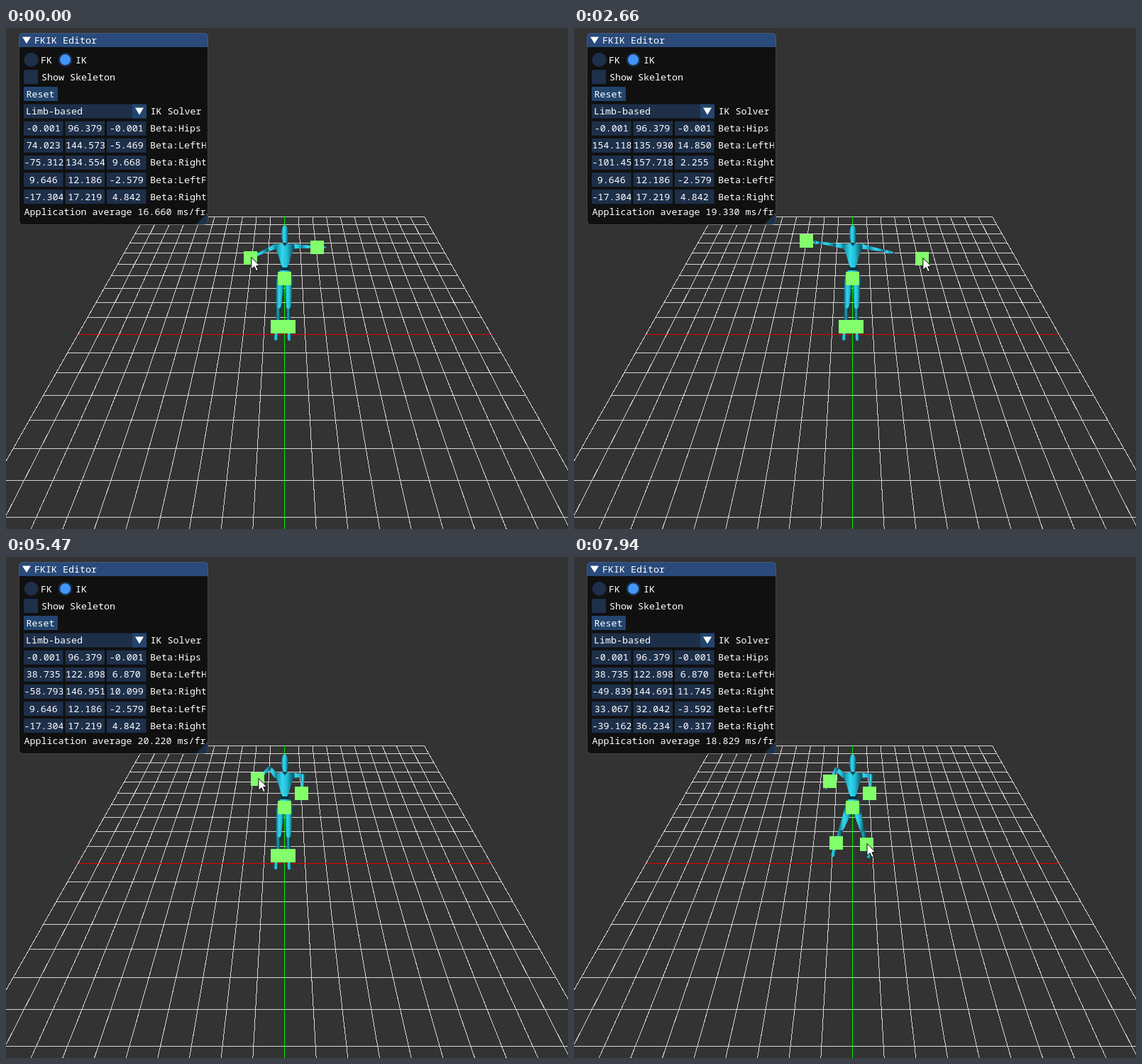
An HTML page that plays this animation: 792x707 px, repeating every 8 s.

```html
<!DOCTYPE html>
<html lang="en">
<head>
<meta charset="utf-8">
<title>FKIK Editor</title>
<style>
  html, body { margin: 0; width: 100%; height: 100%; overflow: hidden; background: #333; }
  svg { display: block; }
  text { font: 13.333px "Noto Sans Mono", "DejaVu Sans Mono", monospace; fill: #fff; white-space: pre; }
</style>
</head>
<body>
<svg id="stage" width="100%" height="100%" viewBox="0 0 792 707">
  <defs>
    <linearGradient id="skin">
      <stop offset="0" stop-color="#127f94"/>
      <stop offset=".35" stop-color="#2fd8f0"/>
      <stop offset=".6" stop-color="#25bdd6"/>
      <stop offset="1" stop-color="#0a4552"/>
    </linearGradient>
    <linearGradient id="shade">
      <stop offset="0" stop-color="#0a3f4a"/>
      <stop offset=".4" stop-color="#1fa3ba"/>
      <stop offset="1" stop-color="#05181c"/>
    </linearGradient>
  </defs>
  <rect width="792" height="707" fill="#333"/>
  <g id="grid" fill="none" shape-rendering="crispEdges"></g>
  <g id="body" fill="url(#skin)"></g>
  <g id="handles" fill="#82ff6a"></g>
  <g id="panel"></g>
  <path id="cursor" d="M0 0V17L4 13.3L6.8 19.3L9.6 18L6.9 12.2H12Z" fill="#fff" stroke="#000"/>
</svg>
<script>
const LOOP = 8000, CELL = 50, REACH = 34, UPPER_ARM = 13.5;
const $ = id => document.getElementById(id);
const clamp = (v, lo, hi) => Math.min(hi, Math.max(lo, v));
const ease = u => u * u * (3 - 2 * u);
const mix = (a, b, u) => a.map((v, i) => v + (b[i] - v) * u);

function add(parent, tag, attrs = {}, text) {
  const el = document.createElementNS('http://www.w3.org/2000/svg', tag);
  for (const k in attrs) el.setAttribute(k, attrs[k]);
  if (text !== undefined) el.textContent = text;
  return parent.appendChild(el);
}

// World units to screen pixels
function project([x, y, z]) {
  const w = 1 - 0.00054 * y - 0.0009556 * z;
  return [392.5 + 0.582 * x / w, -81.1 + (513.4 - 1.048 * y) / w];
}

const HIPS = 0, LEFT_HAND = 1, RIGHT_HAND = 2, LEFT_FOOT = 3, RIGHT_FOOT = 4;
const names = ['Hips', 'LeftHand', 'RightHand', 'LeftFoot', 'RightFoot'];
const rest = [
  [-0.001, 96.379, -0.001], [74.023, 144.573, -5.469], [-75.312, 134.554, 9.668],
  [9.646, 12.186, -2.579], [-17.304, 17.219, 4.842]
];

// Each drag eases through its stops, one per step
const drags = [
  { goal: RIGHT_HAND, start: 50, step: 655,
    stops: [[-62, 124, 12], [-111.65, 148.871, 7.479], [-101.45, 157.718, 2.255]] },
  { goal: LEFT_HAND, start: 2160, step: 500,
    stops: [[154.119, 135.93, 14.85], [58, 110, 14], [38.735, 122.898, 6.87]] },
  { goal: RIGHT_HAND, start: 4420, step: 1430, stops: [[-49.839, 144.691, 11.745]] },
  { goal: RIGHT_FOOT, start: 6480, step: 170, stops: [[-39.162, 36.234, -0.317]], grip: [-5.5, -4] },
  { goal: LEFT_FOOT, start: 7500, step: 300, stops: [[33.067, 32.042, -3.592]] }
];

function pose(t) {
  const values = [...rest];
  for (const { goal, start, step, stops } of drags) {
    const path = [values[goal], ...stops];
    const p = clamp((t - start) / step, 0, stops.length);
    const i = Math.min(Math.floor(p), stops.length - 1);
    values[goal] = mix(path[i], path[i + 1], ease(p - i));
  }
  return values;
}

// The pointer holds the dragged handle, then glides to the next one
function pointer(t, points) {
  const spot = ({ goal, grip = [1, -1] }) => points[goal].map((v, i) => v + grip[i]);
  const next = drags.findIndex(d => t < d.start - 20);
  if (next < 0) return spot(drags[drags.length - 1]);
  if (next === 0) return spot(drags[0]);
  const last = drags[next - 1], leave = last.start + last.step * last.stops.length - 90;
  const u = clamp((t - leave) / (drags[next].start - 20 - leave), 0, 1);
  return mix(spot(last), spot(drags[next]), ease(u));
}

function buildGrid() {
  const line = (a, b, stroke) =>
    add($('grid'), 'path', { d: `M${project(a)}L${project(b)}`, stroke });
  const far = 10 * CELL;
  const across = (v, color) => line([-far, 0, v], [far, 0, v], color);
  const along = (v, color) => line([v, 0, -far], [v, 0, far], color);
  for (let v = -far; v <= far; v += CELL) {
    if (!v) continue;
    along(v, '#d6d6d6');
    across(v, '#d6d6d6');
  }
  across(0, '#e00000');
  along(0, '#00f000');
}

const fields = [];
let status;

function buildPanel() {
  const p = $('panel'), frame = '#1d2f49', button = '#23456d', fieldWidth = 55.5;
  const box = (x, y, width, height, fill) => add(p, 'rect', { x, y, width, height, fill });
  const shape = (d, fill) => add(p, 'path', { d, fill });
  const label = (x, y, s) => add(p, 'text', { x, y }, s);
  const clipped = (x, y, width, s) =>
    add(add(p, 'svg', { x, y, width, height: 20 }), 'text', { y: 14.5 }, s);
  const edge = { x: 18.5, y: 7.5, width: 266, height: 270, rx: 6 };

  add(p, 'rect', { ...edge, fill: '#0f0f0f', 'fill-opacity': .97 });
  shape('M18 27V13Q18 7 24 7H279Q285 7 285 13V27Z', '#294a7a');
  shape('M285 260V271Q285 277 279 277H268Z', '#1c3149');
  add(p, 'rect', { ...edge, fill: 'none', stroke: '#6e6e80', 'stroke-opacity': .4 });
  shape('M23 12.5H35L29 22Z', '#fff');
  label(40, 21.5, 'FKIK Editor');

  for (const x of [35.5, 83.5]) add(p, 'circle', { cx: x, cy: 44.7, r: 10, fill: frame });
  add(p, 'circle', { cx: 83.5, cy: 44.7, r: 7.5, fill: '#4296fa' });
  label(49, 49.5, 'FK');
  label(98, 49.5, 'IK');
  box(25, 59, 20, 20, frame);
  label(50, 74, 'Show Skeleton');
  box(25, 83, 48, 20, button);
  label(28.5, 98, 'Reset');
  box(25, 107.5, 173, 20, frame);
  box(178, 107.5, 20, 20, button);
  shape('M182 112.5H194L188 122.5Z', '#fff');
  label(28, 122, 'Limb-based');
  label(203.5, 122, 'IK Solver');

  names.forEach((name, row) => {
    const y = 131.7 + row * 24.1;
    fields.push([0, 1, 2].map(col => {
      const x = 25 + col * 58.5;
      box(x, y, fieldWidth, 20, frame);
      return s => {
        text.textContent = s;
        text.setAttribute('x', Math.max(.5, (fieldWidth - 8 * s.length) / 2));
      };
      var text;
    }).map((_, col) => {
      const text = clipped(25 + col * 58.5, y, fieldWidth, '');
      return s => {
        text.textContent = s;
        text.setAttribute('x', Math.max(.5, (fieldWidth - 8 * s.length) / 2));
      };
    }));
    clipped(203, y, 78.5, 'Beta:' + name);
  });
  status = clipped(25.5, 249.5, 257, '');
}

// Tapered limb with round ends
function limb(a, b, ra, rb, fill = 'skin') {
  const dx = b[0] - a[0], dy = b[1] - a[1], d = Math.hypot(dx, dy) || 1;
  const at = (p, r) => `${(p[0] - dy / d * r).toFixed(2)} ${(p[1] + dx / d * r).toFixed(2)}`;
  return {
    fill: `url(#${fill})`,
    d: `M${at(a, ra)}L${at(b, rb)}A${rb} ${rb} 0 0 0 ${at(b, -rb)}`
      + `L${at(a, -ra)}A${ra} ${ra} 0 0 0 ${at(a, ra)}Z`
  };
}

function arm(side, goal) {
  const shoulder = [392.5 + 12.5 * side, 308];
  const dx = goal[0] - shoulder[0], dy = goal[1] - shoulder[1], full = Math.hypot(dx, dy);
  const ux = dx / full, uy = dy / full, d = Math.min(full, REACH);
  const bend = Math.min(12, 2.2 * (REACH - d)), along = Math.sqrt(UPPER_ARM ** 2 - bend ** 2);
  const elbow = [
    shoulder[0] + ux * along + uy * bend * side,
    shoulder[1] + uy * along - ux * bend * side
  ];
  const wrist = [shoulder[0] + ux * d, shoulder[1] + uy * d];
  const length = Math.hypot(wrist[0] - elbow[0], wrist[1] - elbow[1]);
  const beyond = px => mix(elbow, wrist, 1 + px / length);
  const palm = beyond(7);
  return [
    limb(shoulder, elbow, 3.6, 2.4), limb(elbow, wrist, 2.6, 1.5),
    limb(wrist, palm, 1.5, 1.8), limb(palm, beyond(13), 1.4, .6),
    limb(wrist, [palm[0], palm[1] + 3], 1, .6)
  ];
}

function leg(side, ankle) {
  const hip = [392.5 + 5.8 * side, 357], knee = mix(hip, ankle, .55);
  const spread = Math.abs(ankle[0] - 392.5);
  const toe = [ankle[0] + side * spread * .2, ankle[1] + 17];
  return [
    limb(knee, ankle, 3.4, 2.2, 'shade'), limb(hip, knee, 5.6, 3.4),
    limb(ankle, toe, 1.8, 2.6), limb(mix(ankle, toe, .8), toe, 2.6, 1.8)
  ];
}

let limbs;
function buildBody() {
  const b = $('body');
  limbs = Array.from({ length: 18 }, () => add(b, 'path'));
  const part = (d, fill) => add(b, 'path', fill ? { d, fill } : { d });
  part('M387 339H399L404 352Q406 360 403 364L394 362H391L383 364Q380 360 382 352Z');
  part('M388 334H398L400 342H386Z', '#08323b');
  part('M390 298H396V304L405 305Q408 308 405 313L401 324Q399 334 396 338H390Q387 334 385 324L381 313Q378 308 381 305L390 304Z');
  part('M389 303L393 308L397 303Z', '#0b4551');
  add(b, 'ellipse', { cx: 393, cy: 290.5, rx: 5, ry: 12.3 });
}

let squares;
function buildHandles() {
  squares = names.map(() => add($('handles'), 'rect', { width: 19, height: 19 }));
}

function draw(t) {
  const values = pose(t), points = values.map(project);
  values.forEach((v, row) => v.forEach((n, col) => fields[row][col](n.toFixed(3))));
  const average = 16.659 + 3.6 * Math.sin(Math.PI * t / 10000);
  status.textContent = `Application average ${average.toFixed(3)} ms/frame`;

  points.forEach(([x, y], i) => {
    squares[i].setAttribute('x', Math.round(x - 9.5));
    squares[i].setAttribute('y', Math.round(y - 9.5));
  });
  const shapes = [
    ...leg(1, points[LEFT_FOOT]), ...leg(-1, points[RIGHT_FOOT]),
    ...arm(1, points[LEFT_HAND]), ...arm(-1, points[RIGHT_HAND])
  ];
  shapes.forEach(({ d, fill }, i) => {
    limbs[i].setAttribute('d', d);
    limbs[i].setAttribute('fill', fill);
  });
  const [x, y] = pointer(t, points);
  $('cursor').setAttribute('transform', `translate(${x.toFixed(1)} ${y.toFixed(1)})`);
}

buildGrid();
buildBody();
buildHandles();
buildPanel();
const start = performance.now();
function tick() {
  draw((performance.now() - start) % LOOP);
  requestAnimationFrame(tick);
}
tick();
</script>
</body>
</html>
```
